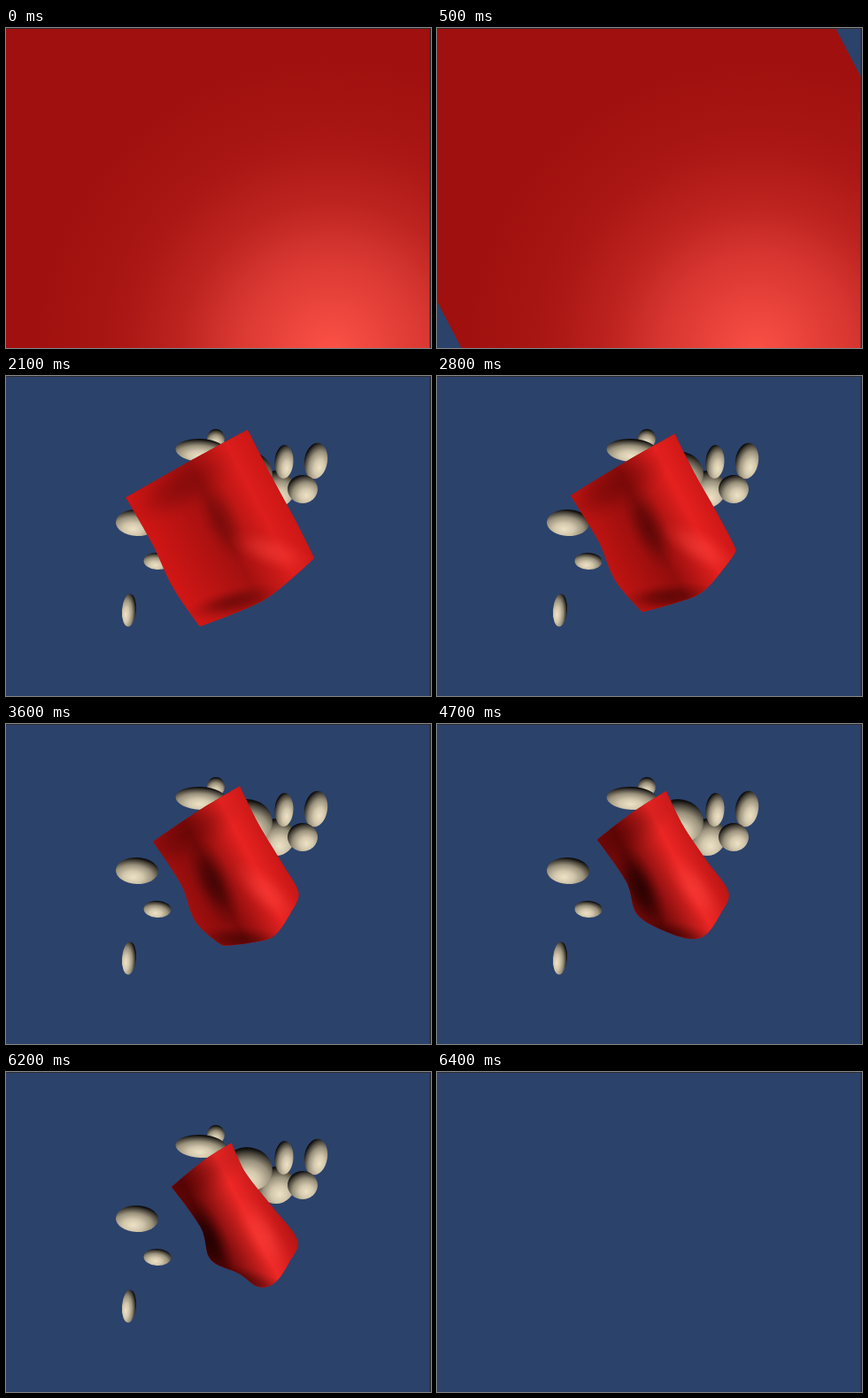
Write an HTML page with a canvas that moves like this. It is 480 px wide and 362 px high and loops after 8000 ms.

```html
<!DOCTYPE html>
<html>
<head>
<meta charset="utf-8">
<title>Falling cloth</title>
<style>
html, body { margin: 0; width: 100%; height: 100%; overflow: hidden; background: #2b426b; }
canvas { display: block; width: 480px; height: 362px; }
</style>
</head>
<body>
<canvas id="stage" width="480" height="362"></canvas>
<script>
const ctx = document.getElementById('stage').getContext('2d');
const W = 480, H = 362, LOOP = 8000, STEP = 100;
const FALL_START = 300, FALL_TIME = 750, NEAREST = .3;
const DRAPE_START = 1100, DRAPE_TIME = 5100, CLEAR_AT = 6400;
const CENTER = { x: 239, y: 181.5 }, CORNER_RADIUS = 134, CORNER_ANGLE = -2.835;

const mix = (a, b, k) => a + (b - a) * k;
const clamp = v => Math.max(0, Math.min(1, v));
const mixPoint = (a, b, k) => ({ x: mix(a.x, b.x, k), y: mix(a.y, b.y, k) });
const tone = (from, to, k) => `rgb(${from.map((v, i) => Math.round(mix(v, to[i], k)))})`;
const settle = (progress, pace) => Math.sin(Math.PI / 2 * clamp(progress * pace));

// x, y, rx, ry, tilt in degrees, back to front
const stones = [
  [237, 71, 10, 11, 0],
  [220, 84, 28.5, 13, 3],
  [148, 166, 24, 15, 2],
  [171, 209.5, 15.5, 9.5, 3],
  [139, 265, 8, 18.5, 4],
  [305, 128, 21, 21, 0],
  [273, 110, 28, 25, 10],
  [314, 97, 10.5, 19, 3],
  [350, 96, 13, 20.5, 9],
  [335, 128, 17, 16, 0]
];

// Where the cloth comes to rest, edge by edge from its left corner: x, y, pace
const restEdges = [
  [[187, 130, 1.05], [222, 101, 1.05]],
  [[254, 81, .85], [270, 115, .85], [301, 153, 1.05]],
  [[329, 190, 1.7], [320, 215, 1.7], [304, 238, 1.6], [285, 243, 1.5]],
  [[263, 228, 1.05], [231, 212, 1.05], [220, 176, 1.05]]
];

function fillEllipse(x, y, rx, ry, tilt, stops, lit = { x: 0, y: 0 }, reach = 1) {
  ctx.save();
  ctx.translate(x, y);
  ctx.rotate(tilt * Math.PI / 180);
  ctx.scale(rx, ry);
  ctx.beginPath();
  ctx.arc(0, 0, 1, 0, 7);
  ctx.fillStyle = withStops(ctx.createRadialGradient(lit.x, lit.y, 0, lit.x, lit.y, reach), stops);
  ctx.fill();
  ctx.restore();
}

function withStops(gradient, stops) {
  stops.forEach(([at, color]) => gradient.addColorStop(at, color));
  return gradient;
}

// Light comes from below and outside; a thin stone turns more of its flank to it
function drawStone([x, y, rx, ry, tilt]) {
  const lx = (x - W / 2) / 200 / rx, ly = .8 / ry;
  const offset = .52 / Math.hypot(lx, ly);
  fillEllipse(x, y, rx, ry, tilt, [
    [0, '#eee2c5'], [.3, '#d3c8ad'], [.6, '#9a917c'], [.82, '#4a453b'], [.95, '#11100e'], [1, '#080808']
  ], { x: lx * offset, y: ly * offset }, 1.52);
}

function softSpot(x, y, rx, ry, tilt, color, strength) {
  const c = a => `rgba(${color},${a * strength})`;
  fillEllipse(x, y, rx, ry, tilt, [[0, c(1)], [.35, c(.75)], [.7, c(.25)], [1, c(0)]]);
}

function squareCorner(n) {
  const angle = CORNER_ANGLE + n * Math.PI / 2;
  return { x: CENTER.x + CORNER_RADIUS * Math.cos(angle), y: CENTER.y + CORNER_RADIUS * Math.sin(angle) };
}

// Each outline point travels from the flat square to its resting place at its own pace
function clothOutline(progress, depth) {
  const cornerSoftness = [0, 0, settle(progress, 1.7) ** 4, settle(progress, 1.05) ** 4];
  return restEdges.flatMap((edge, e) => edge.map(([x, y, pace], i) => {
    const flat = mixPoint(squareCorner(e), squareCorner(e + 1), i / edge.length);
    const point = mixPoint(flat, { x, y }, settle(progress, pace));
    return { ...mixPoint(CENTER, point, 1 / depth), soft: i ? 1 : cornerSoftness[e] };
  }));
}

function traceCurve(points) {
  const n = points.length;
  const at = i => points[(i + n) % n];
  const tangent = i => {
    const a = at(i - 1), b = at(i + 1), s = at(i).soft / 6;
    return { x: (b.x - a.x) * s, y: (b.y - a.y) * s };
  };
  ctx.beginPath();
  ctx.moveTo(points[0].x, points[0].y);
  points.forEach((p, i) => {
    const q = at(i + 1), u = tangent(i), v = tangent(i + 1);
    ctx.bezierCurveTo(p.x + u.x, p.y + u.y, q.x - v.x, q.y - v.y, q.x, q.y);
  });
  ctx.closePath();
}

// Flat cloth under a lamp whose highlight weakens as the cloth drops away
function paintFlat(drop) {
  const x = mix(368, 285, drop), y = mix(368, 335, drop), r = mix(340, 250, drop);
  ctx.fillStyle = withStops(ctx.createRadialGradient(x, y, 0, x, y, r), [
    [0, tone([253, 82, 71], [214, 48, 42], drop)],
    [.32, tone([217, 56, 50], [197, 33, 29], drop)],
    [.5, tone([189, 36, 32], [183, 25, 22], drop)],
    [.7, tone([170, 23, 20], [173, 21, 18], drop)],
    [1, tone([159, 16, 14], [165, 18, 16], drop)]
  ]);
  ctx.fillRect(0, 0, W, H);
}

// Draped cloth: a dark valley on the left and a lit ridge on the right, both along its length
function paintFolds(progress) {
  const k = settle(progress, 1.05), late = k * k;
  const left = { x: mix(160, 212, k), y: mix(214, 194, k) };
  const right = { x: mix(326, 312, k), y: mix(128, 142, k) };
  ctx.globalAlpha = clamp(progress * 4.5);
  ctx.fillStyle = withStops(ctx.createLinearGradient(left.x, left.y, right.x, right.y), [
    [0, tone([222, 24, 22], [110, 8, 8], late)],
    [mix(.5, .18, late), tone([165, 16, 15], [92, 5, 5], late)],
    [mix(.78, .6, late), tone([226, 30, 28], [238, 40, 38], late)],
    [1, tone([205, 22, 20], [172, 16, 16], late)]
  ]);
  ctx.fillRect(0, 0, W, H);
  softSpot(mix(195, 205, k), 125, 70, 30, -30, '70,0,0', .35);
  softSpot(mix(250, 228, k), mix(150, 190, k), 55, 22, 66, '25,0,0', mix(.25, .85, late));
  softSpot(mix(305, 290, k), mix(205, 185, k), 50, 20, mix(0, 60, k), '255,70,64', .5);
  softSpot(mix(250, 268, k), mix(265, 236, k), 55, 16, mix(-28, 15, k), '40,0,0', .5);
  ctx.globalAlpha = 1;
}

function drawCloth(t) {
  const drop = clamp((t - FALL_START) / FALL_TIME) ** 2;
  const progress = clamp((t - DRAPE_START) / DRAPE_TIME);
  ctx.save();
  traceCurve(clothOutline(progress, mix(NEAREST, 1, drop)));
  ctx.clip();
  paintFlat(drop);
  if (progress > 0) paintFolds(progress);
  ctx.restore();
}

function render(t) {
  ctx.fillStyle = '#2b426b';
  ctx.fillRect(0, 0, W, H);
  if (t < CLEAR_AT) {
    stones.forEach(drawStone);
    drawCloth(t);
  }
  ctx.fillStyle = '#2d2d30';
  ctx.fillRect(0, 0, W, 1);
  ctx.fillRect(W - 1.5, 0, 1.5, H);
}

const start = performance.now();
function tick() {
  const t = (performance.now() - start) % LOOP;
  render(Math.floor(t / STEP) * STEP);
  requestAnimationFrame(tick);
}
tick();
</script>
</body>
</html>
```
